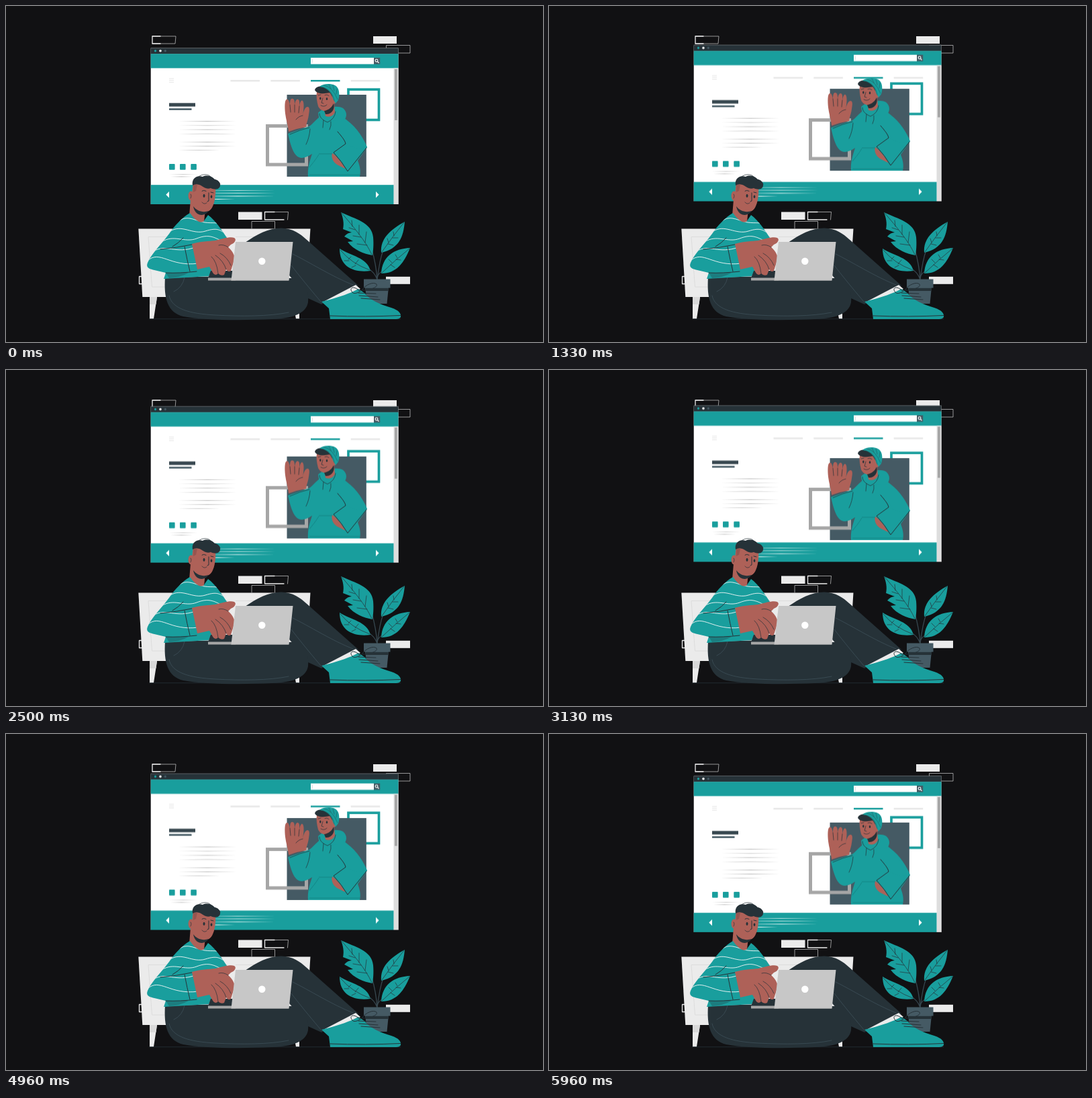
Animation of 800 by 500 pixels, one loop 6000 ms. Source, as an HTML page:

```html
<!DOCTYPE html>
<html lang="en">
<head>
<meta charset="utf-8">
<title>Reading a web page</title>
<style>
  html, body { margin: 0; width: 100%; height: 100%; overflow: hidden; background: #111113; }
  svg { display: block; width: 800px; height: 500px; }
  .teal { fill: #199e9d; }
  .dark { fill: #263238; }
  .slate { fill: #455a64; }
  .skin { fill: #ae6158; }
  .pale { fill: #ebebeb; }
  .white { fill: #fff; }
  .ink, .thin, .wave, .box, .seam { fill: none; stroke-linecap: round; stroke-linejoin: round; }
  .ink { stroke: #263238; stroke-width: 1; }
  .thin { stroke: #263238; stroke-width: .7; }
  .wave { stroke: #f4f8f8; stroke-width: .9; }
  .seam { stroke: #455a64; stroke-width: .6; }
  .box { stroke: #cfcfcf; stroke-width: .7; }
  .edge { stroke: #ebebeb; stroke-width: 1.3; }
</style>
</head>
<body>
<svg viewBox="0 0 800 500">
  <defs>
    <clipPath id="sweaterClip">
      <path d="M274 308C262 315 251 327 243 339C232 354 216 369 211 382C208 389 213 391 221 393L238 397L235 406L302 402L331 348C322 334 312 319 301 311L294 321Q286 325 274 308Z"/>
    </clipPath>
  </defs>

  <!-- loose blocks behind everything -->
  <g>
    <path class="box" d="M218 45H253L252 56H218"/>
    <path class="box edge" d="M230 45H218V56H230"/>
    <rect class="pale" x="547" y="45" width="35" height="11"/>
    <path class="box" d="M566.5 70V58.5H602V70H584"/>
    <rect class="pale" x="346" y="306.5" width="35.5" height="11.5"/>
    <path class="box" d="M385.5 306.5H420.5L419.5 318"/>
    <path class="box edge" d="M400 306.5H385.5V318H414"/>
    <path class="box" d="M366 331V320.5H400.5V331"/>
    <rect class="pale" x="566" y="402.8" width="36" height="11"/>
    <path class="box edge" d="M205 402.5H198.5V413.5H205"/>
  </g>

  <!-- cabinet -->
  <g>
    <path class="pale" d="M197.3 331.5H453.5L447 433H203.3Z"/>
    <path d="M330 343.5H212L217.5 418H330M342 343.5H442" fill="none" stroke="#d8d8d8" stroke-width=".8"/>
    <path class="pale" d="M214 433H225L220 465.5H214ZM427 440H437V465.5H432Z"/>
    <path d="M214 433H225L223.5 444H214Z" fill="#d9d9d9"/>
    <path d="M213 465.7H588" stroke="#263238" stroke-width=".8"/>
  </g>

  <!-- browser -->
  <g id="browser">
    <rect class="white" x="215.7" y="62.5" width="368.8" height="232.5"/>
    <rect class="dark" x="215.7" y="62.5" width="368.8" height="9"/>
    <circle class="teal" cx="222.5" cy="66.8" r="1.7"/>
    <circle class="white" cx="230" cy="66.8" r="1.8"/>
    <circle class="slate" cx="237.3" cy="66.8" r="1.7"/>
    <rect class="teal" x="215.7" y="71.2" width="368.8" height="21.3"/>
    <rect class="white" x="454" y="77" width="94" height="9.5"/>
    <path d="M456.5 79V84.5" stroke="#ccc" stroke-width=".6"/>
    <rect class="slate" x="548" y="77" width="9.2" height="9.5"/>
    <path d="M553.5 82.7L555.5 84.7" stroke="#fff" stroke-width="1.3"/>
    <circle cx="552" cy="81.2" r="1.9" fill="none" stroke="#fff" stroke-width="1.1"/>
    <rect x="577.5" y="92.5" width="7" height="202.5" fill="#dedede"/>
    <rect x="579" y="94" width="3.8" height="76" rx=".5" fill="#a6a6a6"/>
    <path d="M243 108H250M243 110.7H250M243 113.4H250" stroke="#e0e0e0" stroke-width=".8"/>
    <g id="nav"></g>
    <rect x="243" y="144.4" width="39" height="5.2" fill="#37474f"/>
    <rect class="slate" x="243" y="152.3" width="33.5" height="2.6"/>
    <g id="copy" fill="#bdbdbd"></g>
    <g class="teal">
      <rect x="243" y="235" width="8.6" height="8.8" rx="1"/>
      <rect x="259" y="235" width="8.6" height="8.8" rx="1"/>
      <rect x="275.3" y="235" width="8.6" height="8.8" rx="1"/>
    </g>
    <rect class="teal" x="215.7" y="266.2" width="361.8" height="28.8"/>
    <path class="white" d="M238.3 280.7L243 276V285.5ZM555.6 280.7L551 276V285.5Z"/>
    <g id="caption" fill="#e4f4f4"></g>
  </g>

  <!-- waving figure on the page -->
  <g id="waver">
    <rect x="510" y="124.2" width="45.5" height="45.3" fill="none" stroke="#199e9d" stroke-width="3.7"/>
    <rect class="slate" x="418.5" y="132" width="118.3" height="122"/>
    <rect x="389.5" y="178.5" width="58" height="57.5" fill="none" stroke="#a6a6a6" stroke-width="5"/>
    <!-- torso and arms -->
    <path class="teal" d="M466 166C460 171 456 176 452 179L420 190C423 203 426 215 432 222C438 229 447 226 456 220C452 232 449 242 450 254H527C529 245 527 238 524 230L538 210C534 199 523 181 508 170C502 163 478 158 466 166Z"/>
    <path class="skin" d="M486 219C484 225 487 232 493 236L505 242L503 234Q495 224 486 219Z"/>
    <path class="teal" d="M487 219L506 205L524 212L538 210L510 246L503 238Q496 227 487 219Z"/>
    <path class="ink" d="M494 187C500 194 505 200 506 205L488 218Q500 231 509 246L537 211"/>
    <path class="thin" d="M423 191Q438 184 452 181M453 183Q452 196 447 206"/>
    <path d="M466 221C462 228 456 235 452 240M466 220H486M452 251H527" fill="none" stroke="#127d7d" stroke-width=".7"/>
    <!-- raised hand -->
    <path class="skin" d="M421 187C420 177 417 169 416 160C415 150 415 140 418 139C421 138 422 143 423 147C423 141 424 137 427 138C430 138 430 144 430 147C431 141 433 138 435 139C438 140 437 146 437 149C438 143 440 139 442 141C445 145 443 157 442 163C443 157 445 151 449 150C453 150 452 156 451 162C450 170 447 176 447 180Q434 182 421 187Z"/>
    <path class="thin" d="M423 147L424 158M430 147V158M437 149L436 159M442 163Q436 164 432 169"/>
    <!-- hood, neck -->
    <path class="teal" d="M465 159C472 151 493 147 502 152C509 158 508 166 503 171C492 168 486 173 480 174L467 171Z"/>
    <path class="skin" d="M474 152L489 146L490 158Q486 167 476 164Z"/>
    <path class="thin" d="M467 160C467 167 474 171 479 173Q490 168 491 157M473 170L472 181M484 172Q485 178 482 184"/>
    <!-- head -->
    <path class="skin" d="M463 127L489 126C491 138 490 148 483 154C477 159 468 156 465 149C463 142 462 134 463 127Z"/>
    <path class="dark" d="M474 156C481 155 486 150 488 145C491 154 484 162 476 161Z"/>
    <ellipse class="skin" cx="488.5" cy="141" rx="3.2" ry="4.6"/>
    <path class="dark" d="M460 125C461 120 469 118 477 120L491 127L489 137C485 136 485 131 482 129C473 131 463 131 460 125Z"/>
    <path class="teal" d="M467 120C472 115.500 483 115 490 118C496 121 498 130 495 140L491 145L487 138C486 130 480 124 472 121Z"/>
    <path class="thin" d="M472 121C480 123 487 129 489 141M474 118Q486 120 494 139M481 117L484 123M487 118L489 126M493 123L492 131" stroke-opacity=".5"/>
    <g class="dark">
      <ellipse cx="468.3" cy="137.500" rx="1.200" ry="1.900"/>
      <ellipse cx="478" cy="138.200" rx="1.200" ry="1.900"/>
    </g>
    <path class="thin" d="M465 133L469 132M475 132.500Q478 131 481 133.500M472 137L470 144L473 145M469 148Q474 151 478 147"/>
  </g>

  <!-- plant -->
  <g>
    <path d="M553 407C552 393 550 380 545 362M553 407C555 391 557 377 562 363M553 407Q553 398 562 394M553 407Q549 396 540 391" fill="none" stroke="#37474f" stroke-width="1.3"/>
    <path class="teal" d="M499 307C520 317 545 322 547 344C548 356 547 364 546 371C533 369 518 363 509 351L517 350L504 343C507 339 511 337 515 337L502 332C504 323 502 315 499 307Z"/>
    <path class="teal" d="M594 321C592 343 586 361 559 367C557 347 572 333 594 321Z"/>
    <path class="teal" d="M602 360C593 382 582 398 559 398C560 373 578 361 602 360Z"/>
    <path class="teal" d="M497 361C514 372 538 374 543 394C520 397 497 390 497 361Z"/>
    <g class="thin">
      <path d="M500 308C518 329 536 350 545 370M516 328L515 319M526 340L526 326M535 352L537 336M520 333L511 330M529 344L517 342M538 356L523 354"/>
      <path d="M593 322Q576 343 560 366M578 342L577 336M570 352L568 346M576 345L584 345M569 354L577 356"/>
      <path d="M601 361Q580 378 560 397M583 375L580 370M575 382L570 377M581 377L588 378M573 385L579 389"/>
      <path d="M498 363Q514 383 542 393M510 377L514 373M520 384L525 378M511 379L504 379M521 386L515 389"/>
    </g>
    <path class="slate" d="M535 418H570L567.500 443H538Z"/>
    <path class="dark" d="M536 419.500H570L569.500 424H536Z"/>
    <rect class="slate" x="533" y="406.500" width="39.500" height="13"/>
  </g>

  <!-- legs and shoe -->
  <g>
    <path class="dark" d="M356 352C374 340 390 330.500 410 330.500C428 331 438 339 447 347L525 416Q500 427 470 444L430 426L350 408Z"/>
    <path class="seam" d="M425 386Q441 407 469 440M427 369C450 380 486 403 517 415"/>
    <path class="dark" d="M237 404L430 400C446 408 452 425 450 441C447 458 426 465 397 466C353 468 295 468 264 462C240 456 235 434 237 404Z"/>
    <path class="seam" d="M243 431C247 451 274 458 312 460C350 462 392 462 421 456M266 404Q263 419 250 425"/>
    <path class="pale" d="M471 441L521 415L528 421L486 440Z"/>
    <path class="teal" d="M470 440L482 437C496 433 512 428 525 421L534 427C543 438 557 444 574 449C586 453 589 458 588 463Q586 466 581 466H483L481 450Z"/>
    <path class="ink" d="M482 461Q536 463 588 460.500"/>
    <path class="ink" d="M525 427L551 428M526 431L554 433M529 435L557 437M527 424C516 414 510 421 517 427C521 429 527 425 530 423C536 414 548 410 552 414C555 419 540 423 531 423"/>
  </g>

  <!-- reader -->
  <g>
    <path class="skin" d="M275 288L273 312Q286 327 295 321L297 302Z"/>
    <g clip-path="url(#sweaterClip)">
      <rect class="teal" x="205" y="300" width="140" height="110"/>
      <g class="wave">
        <path d="M258 320C270 310 282 320 296 322S314 320 324 328"/>
        <path d="M245 335C262 324 278 341 297 335S320 333 334 345"/>
        <path d="M232 351C250 339 266 353 284 346S310 344 322 350"/>
        <path d="M220 365C238 353 252 370 282 359"/>
        <path d="M211 379C229 362 244 389 286 383"/>
      </g>
      <path class="dark" d="M238 397L272 397Q260 404 243 405Z" opacity=".3"/>
    </g>
    <path class="ink" d="M230 362Q254 360 277 355M266 358Q270 379 274 395M238 397Q258 398 284 395M248 358Q257 353 264 345"/>
    <!-- head -->
    <ellipse class="skin" cx="275.500" cy="282.500" rx="4" ry="7"/>
    <path class="skin" d="M279 262L312 267C313 280 311 293 307 300C303 307 294 309 287 306C281 303 277 296 276 288Z"/>
    <path class="dark" d="M279 298C284 305 293 308 302 305C297 312 290 312 285 309Q280 305 279 298Z"/>
    <path d="M279 265L285 266L283 275L279 277Z" fill="#7d4a48" opacity=".5"/>
    <path class="dark" d="M278 267C276 257 284 251 293 254C299 251 307 253 311 258C318 259 321 266 318 270C315 274 309 273 305 271C298 274 292 267 288 266Q282 264 278 267Z"/>
    <path class="thin" d="M287 254C292 249.500 302 249.500 306 255M309 258Q317 259 319 265"/>
    <g class="dark">
      <ellipse cx="295" cy="282.500" rx="1.500" ry="2.400"/>
      <ellipse cx="306" cy="283.700" rx="1.400" ry="2.300"/>
    </g>
    <path class="ink" d="M292 275.500Q294 273.500 298 275.500M305 277L309 278M302 278V290L300 291"/>
    <path class="thin" d="M275 280Q277 282 275 286M292 292Q295 296 299 293"/>
  </g>

  <!-- laptop and hands -->
  <g>
    <path class="dark" d="M305 394H344V405H301Z"/>
    <path d="M301 404.500H342V408.500H301Z" fill="#a6a6a6"/>
    <path class="skin" d="M277 354C289 350 303 350 312 349C323 346 334 343 340 345C344 347 341 353 335 355L331 359C338 365 342 373 340 378L335 394Q331 397 328 392L325 400Q320 402 316 398Q311 403 307 395L303 388L285 392Z"/>
    <path class="thin" d="M306 373Q314 380 316 398M312 371Q324 379 328 392M319 368Q330 374 335 386M331 359Q324 354 317 356"/>
    <path d="M342 351H427.500L421.500 408.500H335.500Z" fill="#c7c7c7"/>
    <path d="M335.500 408.300H421" stroke="#a6a6a6" stroke-width=".8"/>
    <circle class="white" cx="381.300" cy="379.800" r="5.200"/>
    <path class="pale" d="M422 401L425.500 405H421.700Z"/>
  </g>
</svg>
<script>
  const byId = id => document.getElementById(id);

  // a line of text drawn as a stroke that tapers at both ends
  const taper = ([x1, x2, y]) => {
    const mid = (x1 + x2) / 2;
    return `<path d="M${x1} ${y}Q${mid} ${y - .8} ${x2} ${y}Q${mid} ${y + .8} ${x1} ${y}Z"/>`;
  };
  const fill = (id, rows) => { byId(id).innerHTML = rows.map(taper).join(""); };

  byId("nav").innerHTML = [334.5, 394.3, 454, 513.7].map((x, i) =>
    `<rect x="${x}" y="110" width="43.5" height="2.5" fill="${i === 2 ? "#199e9d" : "#e8e8e8"}"/>`
  ).join("");

  fill("copy", [
    ...[171.5, 177.8, 184, 190.2, 202.5, 208.5].map(y => [257, 343, y]),
    [257, 318, 214.7], [243, 285, 250.3], [245, 278, 254]
  ]);
  fill("caption", [[290, 401, 274.3], [290, 401, 278.7], [290, 401, 283], [290, 341, 287.5]]);

  // steady rise and fall by ten pixels
  const bob = (id, duration) => byId(id).animate(
    [0, -10, 0].map(y => ({ transform: `translateY(${y}px)` })),
    { duration, iterations: Infinity, easing: "linear" }
  );
  bob("browser", 6000);
  bob("waver", 3000);
</script>
</body>
</html>
```
